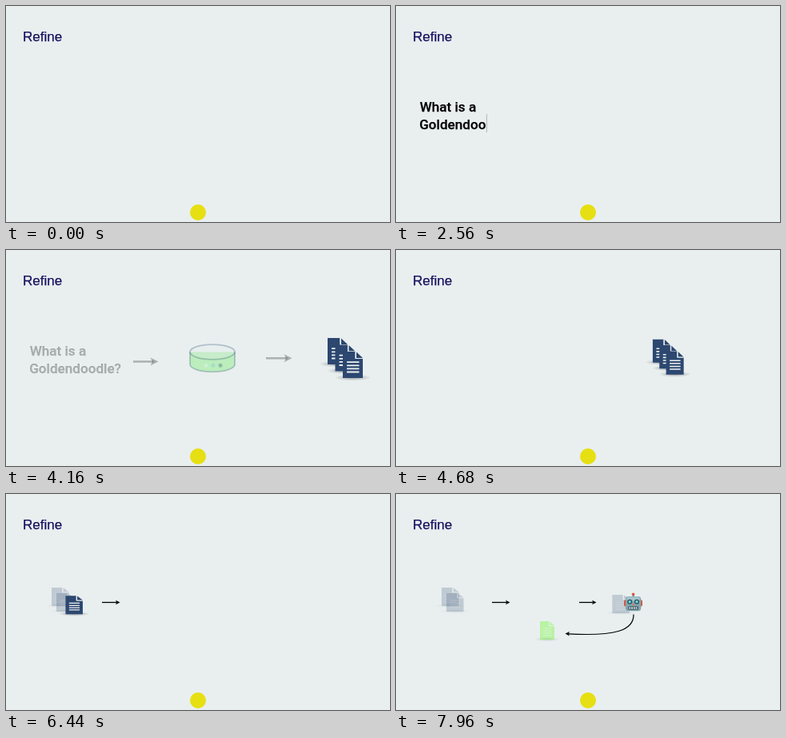
These frames come from a looping animation (480 px wide and 270 px high, 8000 ms). An HTML page with a canvas:

```html
<!DOCTYPE html>
<html lang="en">
<head>
<meta charset="utf-8">
<title>Refine</title>
<style>
  html, body { margin: 0; width: 100%; height: 100%; overflow: hidden; background: #e9efef; }
  canvas { display: block; width: 480px; height: 270px; }
</style>
</head>
<body>
<canvas id="stage"></canvas>
<script>
const LOOP = 8000;
const NAVY = '#2c4770';
const GREEN = '#77f73c';
const DIM = 0.22;
const canvas = document.getElementById('stage');
const ctx = canvas.getContext('2d');
const ratio = window.devicePixelRatio || 1;
canvas.width = 480 * ratio;
canvas.height = 270 * ratio;

const progress = (t, from, to) => Math.min(1, Math.max(0, (t - from) / (to - from)));
const ease = p => (1 - Math.cos(Math.PI * p)) / 2;
const mix = (a, b, p) => a + (b - a) * p;

function layer(alpha, draw) {
  if (alpha <= 0) return;
  ctx.save();
  ctx.globalAlpha *= alpha;
  draw();
  ctx.restore();
}

function shape(points, color) {
  ctx.fillStyle = color;
  ctx.beginPath();
  points.forEach(([x, y]) => ctx.lineTo(x, y));
  ctx.fill();
}

function disc(x, y, r, color) {
  ctx.fillStyle = color;
  ctx.beginPath();
  ctx.arc(x, y, r, 0, 7);
  ctx.fill();
}

function box(x, y, w, h, r, color) {
  ctx.fillStyle = color;
  ctx.beginPath();
  ctx.roundRect(x, y, w, h, r);
  ctx.fill();
}

// A hairline outline gives the lettering its slightly heavier weight.
function label(text, x, y, font, color) {
  ctx.font = font;
  ctx.fillStyle = ctx.strokeStyle = color;
  ctx.lineWidth = 0.25;
  ctx.fillText(text, x, y);
  ctx.strokeText(text, x, y);
}

function shadow() {
  ctx.save();
  ctx.translate(12.5, 32.5);
  ctx.scale(23, 4);
  const soft = ctx.createRadialGradient(0, 0, 0, 0, 0, 1);
  soft.addColorStop(0, 'rgba(60,65,70,.45)');
  soft.addColorStop(1, 'rgba(60,65,70,0)');
  disc(0, 0, 1, soft);
  ctx.restore();
}

// A sheet is designed at 25 x 33 and scaled to the requested size.
function sheet(x, y, w, h, alpha = 1, color = NAVY) {
  layer(alpha, () => {
    ctx.translate(x, y);
    ctx.scale(w / 25, h / 33);
    shadow();
    shape([[0, 0], [15.5, 0], [15.5, 9], [25, 9], [25, 33], [0, 33]], color);
    shape([[17, 0.5], [25, 8], [17, 8]], color);
    ctx.strokeStyle = '#e9efef';
    ctx.lineWidth = 1.1;
    ctx.beginPath();
    ctx.moveTo(16, 0);
    ctx.lineTo(16, 8.5);
    ctx.lineTo(25, 8.5);
    ctx.stroke();
    for (let i = 0; i < 4; i++) box(5, 12.3 + i * 4.1, 15.5, 1.8, 0.5, '#eef2f2');
  });
}

function stack(cx, cy, scale, alpha) {
  layer(alpha, () => {
    ctx.translate(cx, cy);
    ctx.scale(scale, scale);
    for (let i = 0; i < 3; i++) sheet(-22 + i * 9.5, -25 + i * 8.5, 25, 33);
  });
}

function arrowHead(x, y, size, angle = 0) {
  ctx.save();
  ctx.translate(x, y);
  ctx.rotate(angle);
  shape([[0, 0], [-size, -size / 2], [-size * 0.75, 0], [-size, size / 2]], '#000');
  ctx.restore();
}

function arrow(x1, x2, y, width, head) {
  box(x1, y - width / 2, x2 - x1 - head * 0.6, width, 0, '#000');
  arrowHead(x2, y, head);
}

function database() {
  ctx.strokeStyle = '#1d4566';
  ctx.lineWidth = 1.8;
  ctx.fillStyle = '#40e636';
  ctx.beginPath();
  ctx.moveTo(230, 127.5);
  ctx.lineTo(230, 143);
  ctx.ellipse(258, 143, 28, 9.3, 0, Math.PI, 0, true);
  ctx.lineTo(286, 127.5);
  ctx.fill();
  ctx.stroke();
  ctx.fillStyle = '#e1e8e9';
  ctx.beginPath();
  ctx.ellipse(258, 127.5, 28, 9.3, 0, 0, 7);
  ctx.fill();
  ctx.stroke();
  disc(250, 144.3, 2.5, '#fff');
  disc(259, 144.3, 2.5, '#63b8dc');
  disc(268, 144.3, 2.5, '#17365c');
}

function robot() {
  box(295.6, 125, 2, 4, 0, '#5d7f89');
  disc(296.6, 125.3, 1.8, '#d9573f');
  box(285, 132.5, 3, 8, 1.4, '#d9573f');
  box(305, 132.5, 3, 8, 1.4, '#d9573f');
  box(287, 128, 19.2, 18.3, 3.5, '#7fa6b1');
  box(288.3, 128.6, 16.6, 5, 2.5, '#a5c5cd');
  for (const x of [292.2, 301]) {
    disc(x, 134.8, 3, '#334b56');
    disc(x, 134.8, 1.7, '#62dce5');
  }
  shape([[296.6, 136.5], [298.3, 139.3], [294.9, 139.3]], '#e0734d');
  box(290.3, 140.6, 12.6, 3.8, 1.2, '#344953');
  for (let i = 0; i < 4; i++) box(291.3 + i * 2.75, 141.4, 2, 2.2, 0.3, '#e8f0ef');
}

function returnArrow() {
  ctx.strokeStyle = '#000';
  ctx.lineWidth = 1.2;
  ctx.beginPath();
  ctx.moveTo(297, 150.5);
  ctx.bezierCurveTo(297.5, 171, 273, 178, 215, 174.8);
  ctx.stroke();
  arrowHead(211.5, 174.4, 5.5, Math.PI + 0.06);
}

const question = ['What is a ', 'Goldendoodle?'];
const questionFont = '500 17.1px Roboto, sans-serif';
const keyTimes = [1040, 1120, 1240, 1360, 1400, 1480, 1560, 1600, 1640, 1720, 1960, 2080];
const typedCount = t => t < 2200
  ? keyTimes.filter(k => t >= k).length
  : Math.min(23, 13 + Math.floor((t - 2200) / 60));

function typing(t) {
  const count = typedCount(t);
  const first = question[0].slice(0, count);
  const second = question[1].slice(0, Math.max(0, count - 10));
  const onSecond = t >= 1800;
  label(first, 29.7, 132, questionFont, '#000');
  label(second, 29.2, 154, questionFont, '#000');
  const x = 29.7 + ctx.measureText(onSecond ? second : first).width;
  const cursor = progress(t, 480, 960) * (1 - progress(t, 2800, 2980));
  layer(cursor, () => box(x, onSecond ? 135 : 112, 1, 23, 0, '#b4b8b8'));
}

function retrieval(t) {
  const shown = progress(t, 3000, 3400);
  const left = 1 - ease(progress(t, 3640, 4440));
  layer(left, () => typing(t));
  layer(shown * left, () => {
    arrow(159, 190.5, 139.5, 2.5, 10);
    database();
    arrow(325, 357.5, 135.3, 2.5, 10);
  });
  const move = ease(progress(t, 4394, 5285));
  stack(mix(424, 67.5, move), mix(135, 129.2, move), mix(1, 0.49, move),
    shown * (1 - progress(t, 5240, 5520)));
}

function refinement(t) {
  const arrive = progress(t, 5200, 5500);
  const dim = mix(1, DIM, ease(progress(t, 5920, 6420)));
  sheet(57, 117, 21.5, 23, arrive * dim);
  sheet(63, 124, 21.5, 23, arrive * dim);
  layer(arrive, () => arrow(120, 142.5, 135.5, 1.3, 5.5));

  const toMiddle = ease(progress(t, 6420, 7250));
  const toRobot = ease(progress(t, 7250, 7720));
  const x = mix(mix(74.3, 175.5, toMiddle), 270.3, toRobot);
  const used = mix(1, DIM, progress(t, 7640, 7920));
  sheet(x, mix(127.2, 126, toRobot), 21.5, 23, progress(t, 5580, 5880) * used);

  layer(progress(t, 7250, 7520), () => {
    arrow(229, 250.5, 135.5, 1.3, 5.5);
    robot();
  });
  layer(progress(t, 7560, 7840), returnArrow);
  sheet(180, 159, 18, 23, 0.42 * progress(t, 7680, 7960), GREEN);
}

function frame() {
  const t = performance.now() % LOOP;
  ctx.setTransform(ratio, 0, 0, ratio, 0, 0);
  ctx.fillStyle = '#e9efef';
  ctx.fillRect(0, 0, 480, 270);
  label('Refine', 21, 44, '17px "Liberation Sans", Arial, sans-serif', '#15105f');
  disc(240, 258, 10, '#e6df12');
  retrieval(t);
  refinement(t);
  requestAnimationFrame(frame);
}
frame();
</script>
</body>
</html>
```
